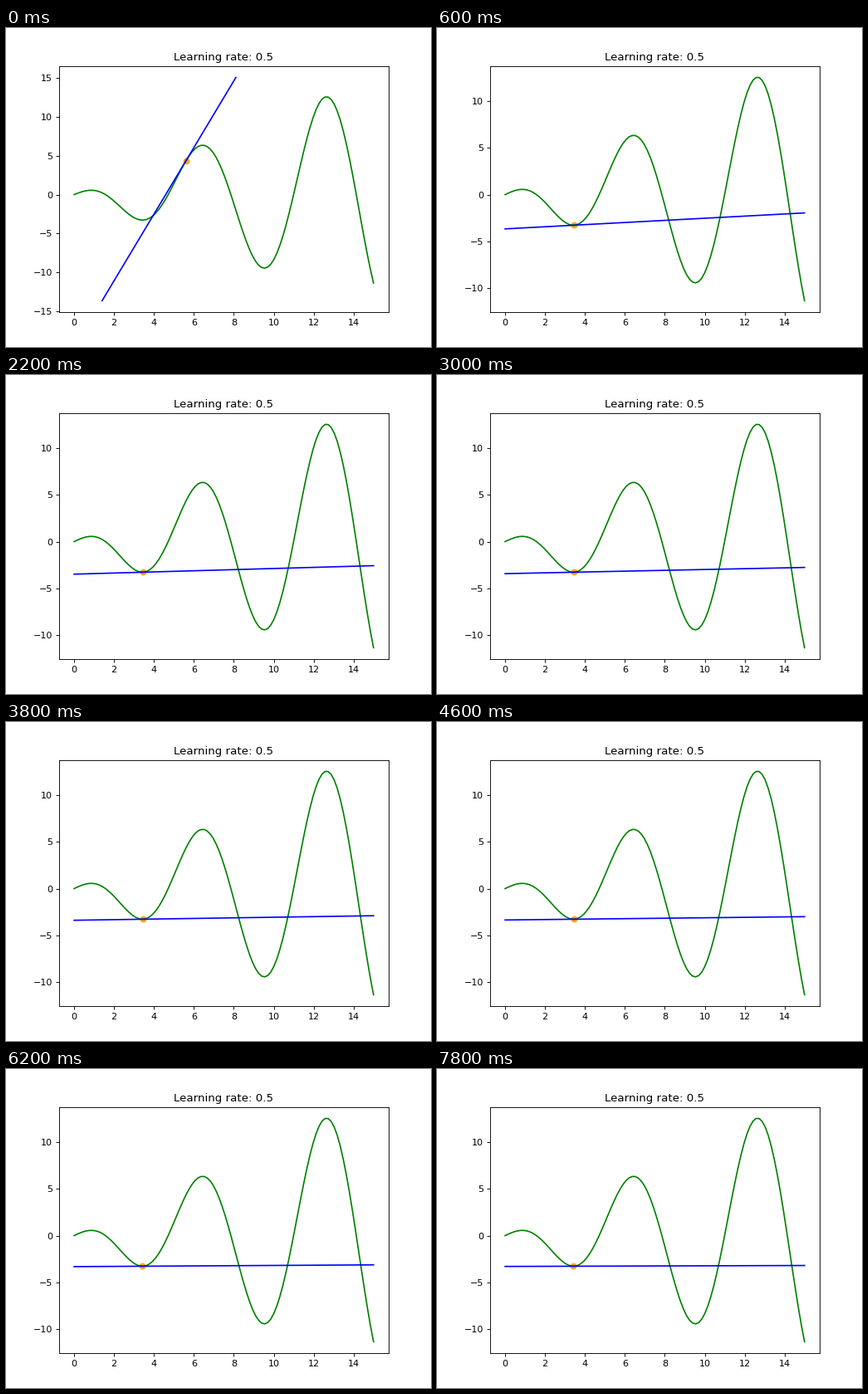
A matplotlib script for the animation above (8000 ms loop, 512 px wide and 384 px high).

```python
import matplotlib.pyplot as plt
import numpy as np
from matplotlib.animation import FuncAnimation

RATE = 0.5
STEPS = 40
INTERVAL = 200


def curve(x):
    return x * np.cos(x)


def slope(x):
    return np.cos(x) - x * np.sin(x)


def descend(x, steps):
    path = [x]
    for _ in range(steps - 1):
        path.append(path[-1] - RATE * slope(path[-1]))
    return path


xs = np.linspace(0, 15, 100)
ys = curve(xs)
path = descend(xs[37], STEPS)


def tangent(x):
    """End points of the tangent at x, kept within 1.2 times the curve's range."""
    y, m = curve(x), slope(x)
    limits = 1.2 * np.array([ys.min(), ys.max()])
    crossings = np.sort(x + (limits - y) / m)
    ends = np.clip(crossings, xs[0], xs[-1])
    return ends, y + m * (ends - x)


fig, ax = plt.subplots(figsize=(6.4, 4.8), dpi=80)


def draw(step):
    x = path[step]
    ax.clear()
    ax.set_title(f"Learning rate: {RATE}")
    ax.plot(xs, ys, color="green")
    ax.plot(*tangent(x), color="blue")
    ax.scatter([x], [curve(x)], color="orange")


anim = FuncAnimation(fig, draw, frames=STEPS, interval=INTERVAL,
                     init_func=lambda: None, repeat=True, repeat_delay=0)
plt.show()
```
